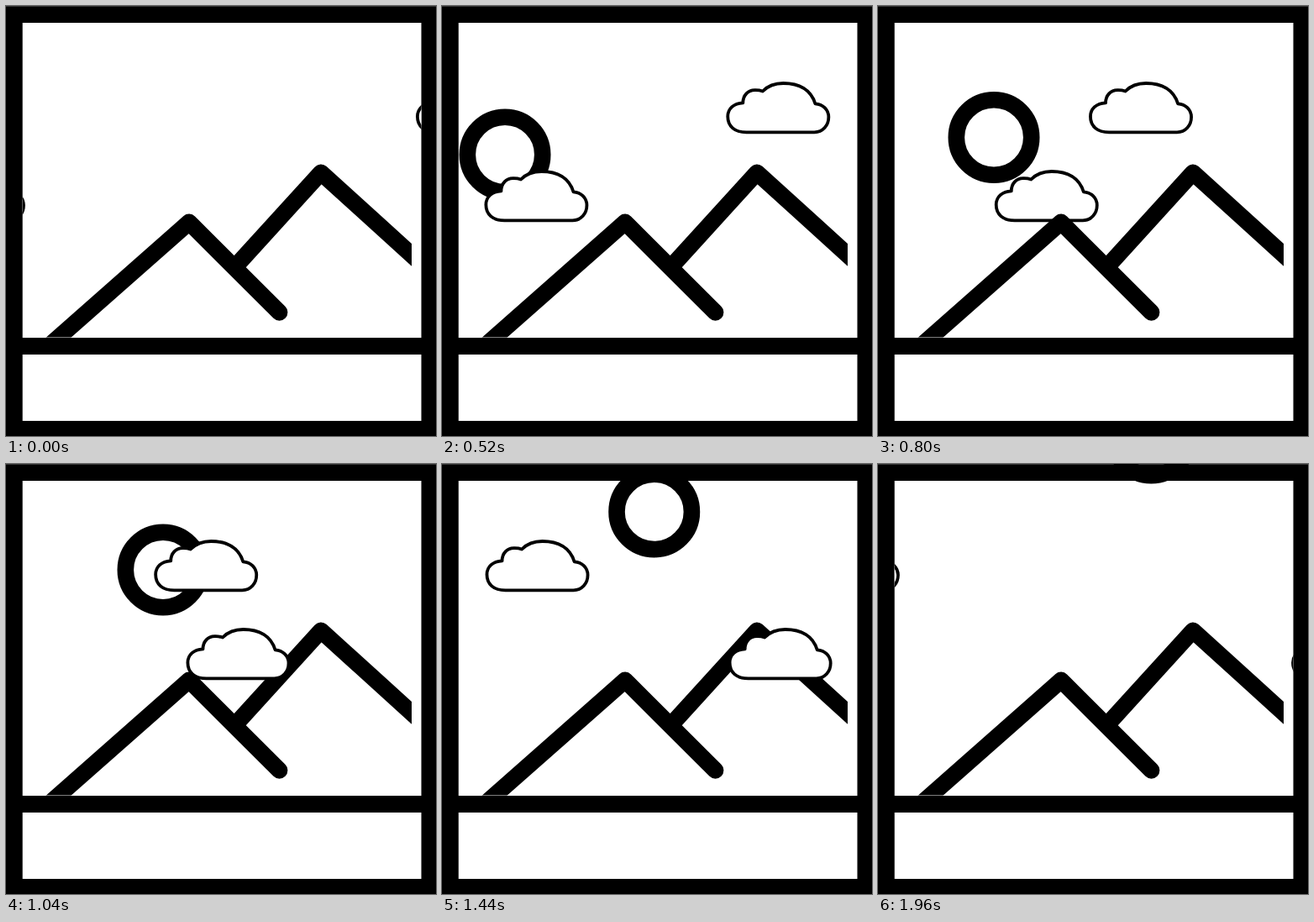
An HTML page that plays this animation: 512x512 px, repeating every 2 s.

```html
<!DOCTYPE html>
<html lang="en">
<head>
<meta charset="utf-8">
<title>Landscape</title>
<style>
  html, body { margin: 0; width: 100%; height: 100%; overflow: hidden; background: #000; }
  svg { display: block; width: 100vw; height: 100vh; }
  .ridge { fill: none; stroke: #000; stroke-width: 19.8; stroke-linejoin: round; }
  .cloud { fill: #fff; stroke: #000; stroke-width: 3.8; stroke-linejoin: round; }
</style>
</head>
<body>
<svg viewBox="0 0 512 512">
  <defs>
    <path id="cloud" class="cloud" d="M20 26 C9 26.5 1.9 33 1.9 42.3 C1.9 54 10 61 24 61 L105 61
      C115 61 122 53 122 43 C122 34 115 27.5 106 27 C101 10.5 87 2.7 68 2.7
      C58 2.7 49.5 6 43.5 12.2 C40 11 37 10.8 34 10.9 C26 11 20 17 20 26 Z"/>
    <clipPath id="sky"><rect x="19.7" y="20" width="474.8" height="375"/></clipPath>
    <clipPath id="ground"><rect x="20" y="20" width="463" height="374.5"/></clipPath>
  </defs>

  <rect width="512" height="512"/>
  <rect width="512" height="1" fill="#333"/>
  <rect x="19.7" y="20" width="474.8" height="375" fill="#fff"/>
  <rect x="19.7" y="415" width="474.8" height="79" fill="#fff"/>

  <circle id="sun" r="44.7" fill="none" stroke="#000" stroke-width="19.6"/>
  <path class="ridge" clip-path="url(#ground)" d="M277 306 L375 198.3 L500 311.7"/>
  <g clip-path="url(#sky)">
    <use id="high" href="#cloud"/>
    <use id="low" href="#cloud"/>
  </g>
  <g clip-path="url(#ground)">
    <path class="ridge" stroke-linecap="round" d="M40 414.6 L218 257.5 L325.5 364.8"/>
  </g>
</svg>
<script>
  const LOOP = 2000, TICK = 40, RATE = 0.96;

  // Sun path knots: step, x, y
  const knots = [
    [0, -39, 182], [12, 75, 177], [19, 138, 156.5], [25, 187, 126],
    [31, 229, 87], [39, 275.5, 26], [47, 325.3, -31]
  ];
  const $ = id => document.getElementById(id);
  const sun = $('sun'), high = $('high'), low = $('low');

  const slope = (a, b, c) => (b[c] - a[c]) / (b[0] - a[0]);

  function tangent(i, c) {
    const p = knots[i - 1], q = knots[i], r = knots[i + 1];
    if (!p) return slope(q, r, c);
    if (!r) return slope(p, q, c);
    const before = q[0] - p[0], after = r[0] - q[0];
    return (slope(p, q, c) * after + slope(q, r, c) * before) / (before + after);
  }

  // Cubic Hermite interpolation of one coordinate
  function along(step, c) {
    let i = 0;
    while (i < knots.length - 2 && step > knots[i + 1][0]) i++;
    const a = knots[i], b = knots[i + 1], h = b[0] - a[0];
    const u = (step - a[0]) / h, v = 1 - u;
    return v * v * (1 + 2 * u) * a[c] + u * u * (3 - 2 * u) * b[c]
      + h * u * v * (v * tangent(i, c) - u * tangent(i + 1, c));
  }

  function place(el, x, y) {
    el.setAttribute('transform', `translate(${x.toFixed(2)} ${y.toFixed(2)})`);
  }

  function draw() {
    const tick = Math.floor(performance.now() % LOOP / TICK);
    const step = Math.round(tick * RATE);
    place(sun, along(step, 1), along(step, 2));
    place(high, 488 - 12.47 * step, 89.3);
    place(low, -101 + 12.62 * step, 194.3);
    requestAnimationFrame(draw);
  }
  draw();
</script>
</body>
</html>
```
